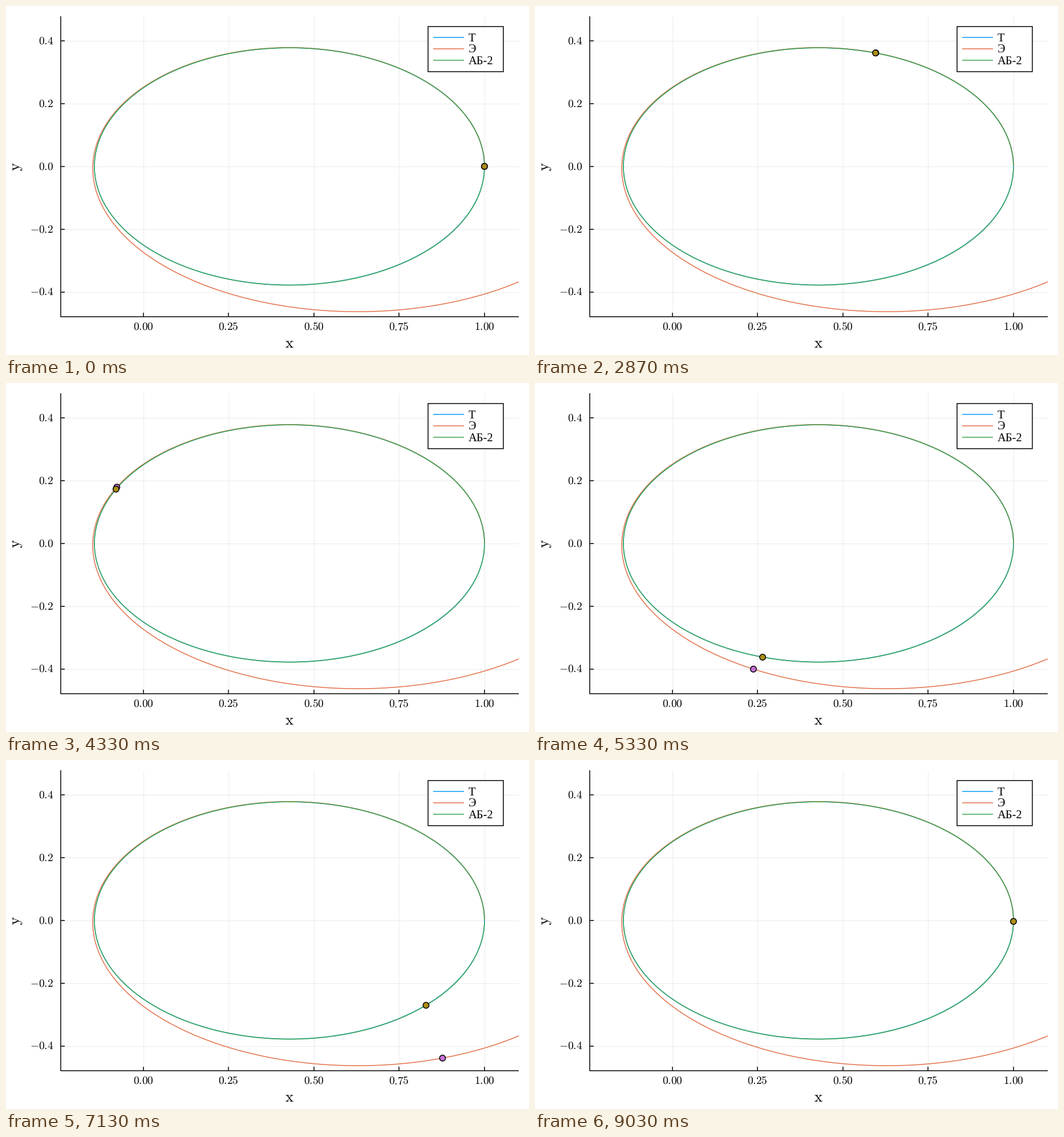
A matplotlib script that plays this animation: 917 px wide and 611 px high, repeating every 9.06 s.

```python
import numpy as np
import matplotlib.pyplot as plt
from matplotlib.animation import FuncAnimation
from matplotlib.patches import Circle, Rectangle

W, H, DPI = 917, 611, 64          # 917/64 and 611/64 are exact in binary
PT = 72 / DPI                     # points per pixel
LOOP, TICK = 9060, 20             # ms
STEP, PER_POSE, POSES = 0.001, 10, 272

LEFT, RIGHT, TOP, BOTTOM = 95.5, 899, 18, 543.5
BLUE, ORANGE, GREEN = "#009AFA", "#E36F47", "#3EA44E"
PURPLE, GOLD = "#C371D2", "#AC8E18"

plt.rcParams.update({
    "mathtext.fontset": "cm",
    "font.family": "Liberation Serif",
    "text.hinting": "none",
    "lines.solid_capstyle": "butt",
})


def to_px(x, y):
    return 240.5 + 598.4 * x, 280.8 - 549.4 * y


def deriv(s):
    x, y, vx, vy = s
    r3 = (x * x + y * y) ** 1.5
    return np.array([vx, vy, -x / r3, -y / r3])


def integrate(adams):
    """Orbit from aphelion by Euler or two-step Adams-Bashforth."""
    s, last = np.array([1.0, 0.0, 0.0, 0.5]), None
    path = [s[:2]]
    for _ in range(PER_POSE * (POSES - 1)):
        d = deriv(s)
        slope = d if last is None or not adams else 1.5 * d - 0.5 * last
        s, last = s + STEP * slope, d
        path.append(s[:2])
    return np.column_stack(to_px(*np.array(path).T))


fig = plt.figure(figsize=(W / DPI, H / DPI), dpi=DPI, facecolor="white")
ax = fig.add_axes([0, 0, 1, 1])
ax.set_xlim(0, W)
ax.set_ylim(H, 0)
ax.axis("off")

frame = Rectangle((LEFT, TOP), RIGHT - LEFT, BOTTOM - TOP, transform=ax.transData)


def line(xs, ys, color="black", width=1.5, z=2, **kw):
    return ax.plot(xs, ys, color=color, lw=width * PT, zorder=z, **kw)[0]


def label(x, y, text, size=19.5, **kw):
    ax.text(x, y, text, size=size * PT, va="baseline", zorder=7, **kw)


# grid, ticks and axes
for v in (0, 0.25, 0.5, 0.75, 1):
    x = to_px(v, 0)[0]
    line([x, x], [TOP, BOTTOM], width=0.76, z=1, alpha=0.1)
    line([x, x], [BOTTOM - 7, BOTTOM])
    label(x, 567.2, f"${v:.2f}$", ha="center")
for v in (-0.4, -0.2, 0, 0.2, 0.4):
    y = to_px(0, v)[1]
    line([LEFT, RIGHT], [y, y], width=0.76, z=1, alpha=0.1)
    line([LEFT, LEFT + 7], [y, y])
    label(83, y + 6.5, f"${v:.1f}$", ha="right")
line([LEFT, LEFT, RIGHT], [TOP, BOTTOM, BOTTOM])
label(497, 598.3, r"$\mathrm{x}$", 26.8, ha="center")
label(24.6, 280.8, r"$\mathrm{y}$", 26.8, ha="center",
      rotation=90, rotation_mode="anchor")

# orbits
a, e = 4 / 7, 0.75
u = np.linspace(0, 2 * np.pi, 600)
exact = np.column_stack(to_px(a * e + a * np.cos(u),
                              a * np.sqrt(1 - e * e) * np.sin(u)))
euler, adams = integrate(False), integrate(True)
for path, color in ((exact, BLUE), (euler[::2], ORANGE), (adams[::2], GREEN)):
    line(*path.T, color, z=3).set_clip_path(frame)

# legend
ax.add_patch(Rectangle((740.2, 35.8), 132, 78.8, fc="white", ec="black",
                       lw=1.5 * PT, zorder=5))
for y, color, name in ((55.3, BLUE, "Т"), (75.1, ORANGE, "Э"), (94.9, GREEN, "АБ-2")):
    line([749, 803], [y, y], color, z=6)
    label(811, y + 6.8, name, 20.5)


def dot(color):
    c = Circle((0, 0), 5.2, fc=color, ec="black", lw=1.5 * PT, zorder=4)
    ax.add_patch(c)
    c.set_clip_path(frame)
    return c


dots = [(dot(PURPLE), euler), (dot(GOLD), adams)]


def update(i):
    # 30 poses a second, with start times rounded to 10 ms
    pose = min((6 * i + 4) // 10, POSES - 1)
    for c, path in dots:
        c.center = path[pose * PER_POSE]
    return [c for c, _ in dots]


anim = FuncAnimation(fig, update, frames=LOOP // TICK, interval=TICK,
                     repeat=True, repeat_delay=0, blit=False)
plt.show()
```
